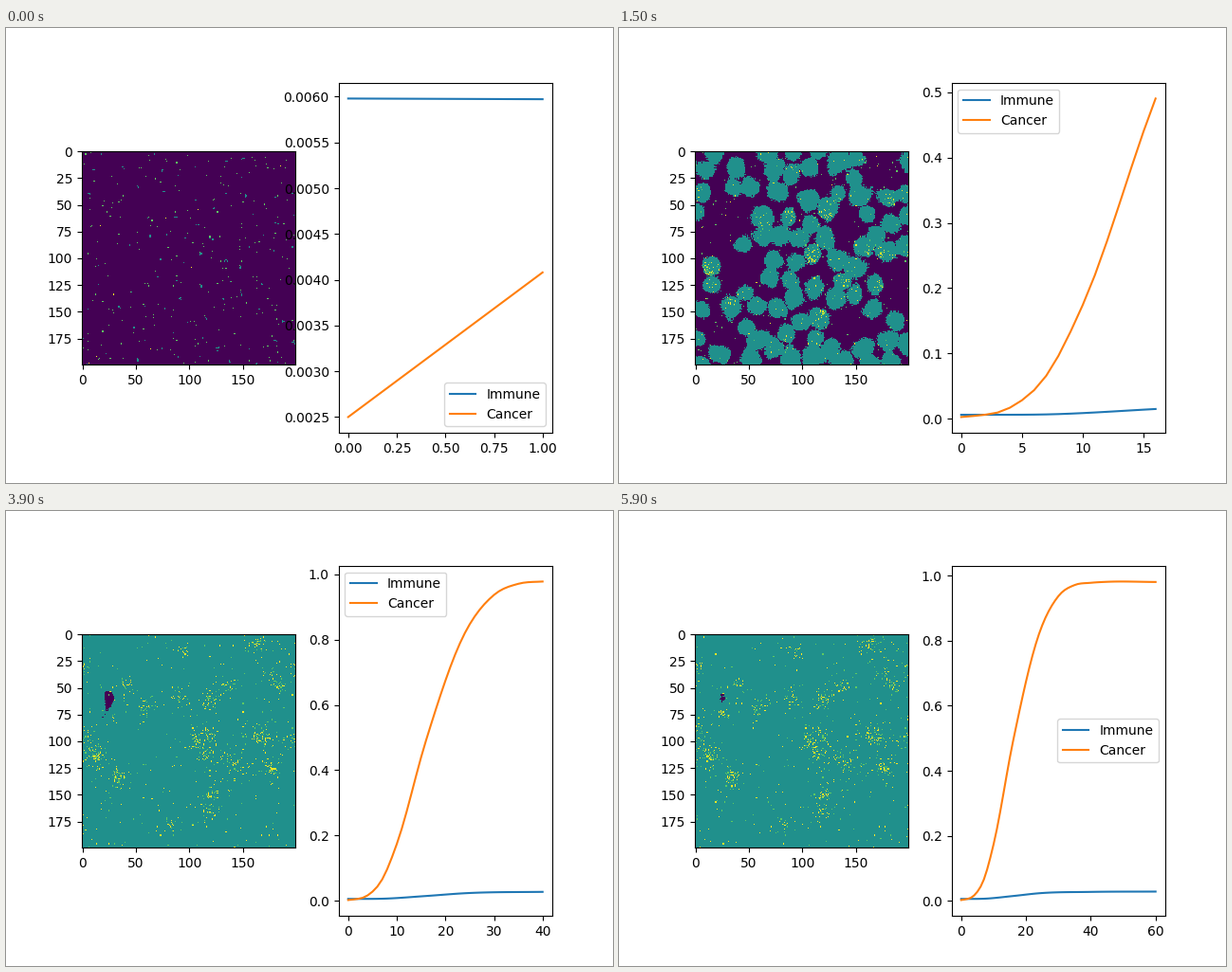
A matplotlib script for the animation above (6000 ms loop, 640 by 480 pixels).

```python
import numpy as np
import matplotlib.pyplot as plt
from matplotlib.animation import FuncAnimation

SIZE = 200
AREA = SIZE ** 2
FRAMES = 60
CANCER, IMMUNE, BOUND = 2, 3, 4
FULL = .981  # cancer share once the tissue is overgrown
rng = np.random.default_rng(11)
steps = np.arange(FRAMES + 1)

# Key places as (column, row); random ones are added around them
SEEDS = [(10, 18), (38, 15), (105, 15), (135, 10), (76, 38), (106, 46),
         (152, 42), (182, 68), (44, 88), (15, 125), (5, 148), (34, 146),
         (48, 165), (22, 189), (168, 125), (165, 148), (180, 177),
         (138, 122), (112, 175)]
GAPS = [(25, 56), (12, 82), (40, 112), (22, 168), (142, 72), (147, 162),
        (188, 125), (180, 20)]
CLUSTERS = [(14, 115), (33, 134), (165, 8), (176, 126), (58, 70), (120, 152),
            (172, 98), (120, 62), (108, 104), (142, 122)]


def smooth_curve(times, values):
    """Cubic curve through a few key points, sampled at every step."""
    times, values = np.array(times), np.array(values)
    slope = np.gradient(values, times)
    i = np.clip(np.searchsorted(times, steps, "right") - 1, 0, len(times) - 2)
    width = times[i + 1] - times[i]
    u = (steps - times[i]) / width
    ease = u * u * (3 - 2 * u)
    bend = u * (1 - u) * ((1 - u) * slope[i] - u * slope[i + 1])
    return values[i] + (values[i + 1] - values[i]) * ease + width * bend


cancer = smooth_curve(
    [0, 1, 4, 7, 10, 16, 24, 30, 35, 40, 45, 60],
    [.0025, .00408, .0167, .0657, .174, .4905, .82, .937, .971, .978, FULL, .9805])
immune = smooth_curve([0, 2, 7, 16, 24, 40, 60],
                      [.00598, .00598, .0065, .0148, .0233, .0275, .0285])


def nearest(point, places):
    return np.hypot(*(np.array(places) - point).T).min()


def scatter_seeds():
    """Key seeds plus random ones that keep clear of each other and the gaps."""
    seeds = list(SEEDS)
    for point in rng.uniform(0, SIZE, (900, 2)):
        if nearest(point, seeds) > 16 and nearest(point, GAPS) > 21:
            seeds.append(tuple(point.astype(int)))
    return seeds


def spread_order():
    """Rank of every cell, 0 to 1, in the order the tumour reaches it."""
    y, x = np.mgrid[:SIZE, :SIZE]
    reach = np.full((SIZE, SIZE), 1e9)
    for sx, sy in scatter_seeds():
        reach = np.minimum(reach, np.hypot(x - sx, y - sy) / rng.uniform(.7, 1))
    wave = np.zeros_like(reach)
    for _ in range(14):
        kx, ky = rng.normal(0, .25, 2)
        wave += np.sin(kx * x + ky * y + rng.uniform(0, 2 * np.pi))
    rough = rng.normal(0, .7, reach.shape) * np.minimum(1, reach / 3)
    reach = reach * (1 + .04 * wave) + rough
    for i, (gx, gy) in enumerate(GAPS):
        delay = 7 if i else 22  # the first gap closes last
        reach += delay * np.exp(-(x - gx) ** 2 / 90 - (y - gy) ** 2 / 200)
    return reach.ravel().argsort().argsort().reshape(reach.shape) / AREA


def immune_paths(order):
    """Positions (step, cell, xy): scattered first cells, then tumour clusters."""
    total, first = int(immune.max() * AREA) + 1, int(immune[0] * AREA)
    centres = np.vstack([CLUSTERS, rng.uniform(0, SIZE, (18, 2))])
    weight = 1 / (1 + .08 * np.arange(len(centres)))
    pick = rng.choice(len(centres), total - first, p=weight / weight.sum())
    width = rng.gamma(2.2, 2.4, (total - first, 1))
    late = centres[pick] + rng.normal(0, 1, (total - first, 2)) * width
    # cells appear where the tumour has already arrived
    col, row = late.astype(int).T % SIZE
    late = late[order[row, col].argsort()]
    home = np.vstack([rng.uniform(0, SIZE, (first, 2)), late])

    move = rng.integers(-1, 2, (FRAMES + 1, total, 2))
    wander = np.interp(steps, [0, 12, 28], [1, .5, .12])[:, None]
    chance = np.where(np.arange(total) < first, wander, .12)
    move *= (rng.random(chance.shape) < chance)[..., None]
    return np.floor(home + move.cumsum(axis=0)).astype(int) % SIZE


order = spread_order()
paths = immune_paths(order)
mood = rng.random(paths.shape[:2])


def tissue(step):
    filled = order < cancer[step] / FULL
    grid = np.where(filled, CANCER, 0)
    count = int(immune[step] * AREA)
    col, row = paths[step, :count].T
    bound = mood[step, :count] < np.where(filled[row, col], .55, .07)
    grid[row, col] = np.where(bound, BOUND, IMMUNE)
    return grid


fig, (left, right) = plt.subplots(1, 2, figsize=(6.4, 4.8), dpi=100)
image = left.imshow(tissue(1), vmin=0, vmax=BOUND, cmap="viridis",
                    interpolation="nearest")
lines = [right.plot([], [], label=name)[0] for name in ("Immune", "Cancer")]
right.legend(loc="best")


def update(frame):
    step = frame + 1
    image.set_data(tissue(step))
    for line, data in zip(lines, (immune, cancer)):
        line.set_data(steps[:step + 1], data[:step + 1])
    right.relim()
    right.autoscale_view()
    return [image, *lines]


anim = FuncAnimation(fig, update, frames=FRAMES, interval=100, repeat=True,
                     repeat_delay=0)
plt.show()
```
